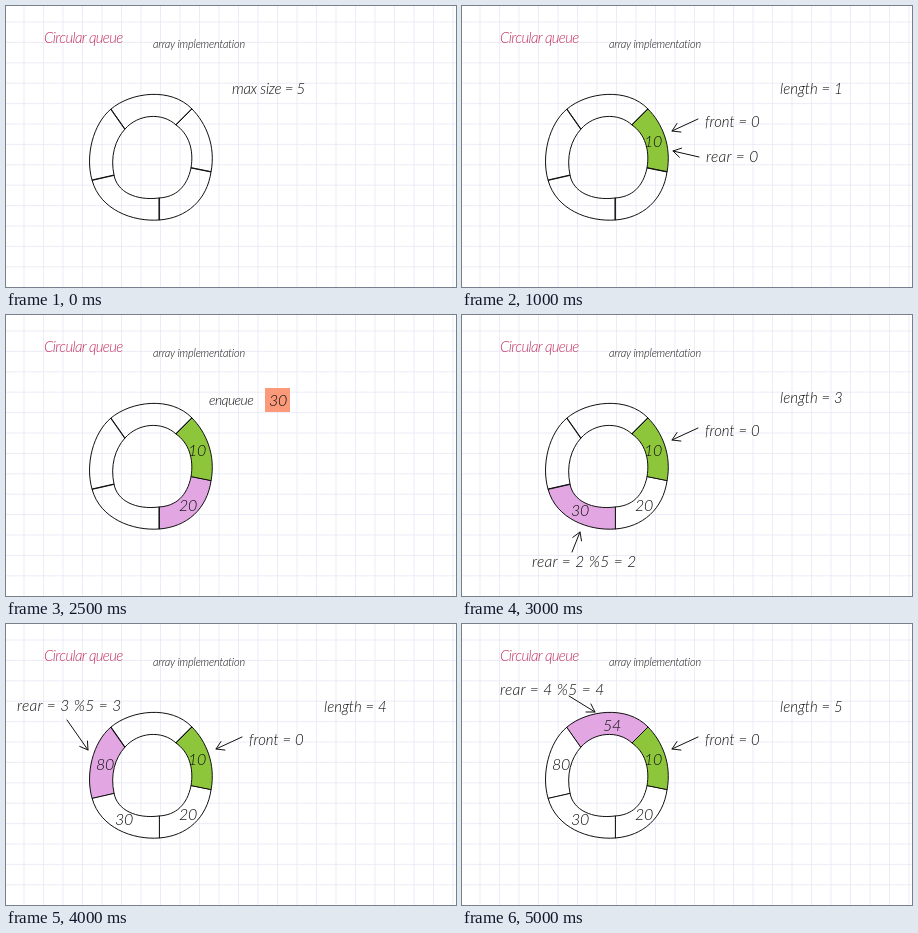
An HTML page that plays this animation: 450 px wide and 281 px high, repeating every 6000 ms.

```html
<!DOCTYPE html>
<html lang="en">
<head>
<meta charset="utf-8">
<title>Circular queue</title>
<style>
html, body { margin: 0; width: 100%; height: 100%; overflow: hidden; background: #fff; }
svg { display: block; width: 100vw; height: 100vh; }
text { font: italic 300 15px Lato, "Open Sans", sans-serif; fill: #111; }
.num { font-size: 16px; letter-spacing: -.4px; text-anchor: middle; }
.line { fill: none; stroke: #111; stroke-width: 1; stroke-linecap: round; stroke-linejoin: round; }
</style>
</head>
<body>
<svg id="stage" viewBox="0 0 450 281"></svg>
<script>
const NS = "http://www.w3.org/2000/svg";
const stage = document.getElementById("stage");
const STEP = 500, LOOP = 6000;
const GREEN = "#8dc63b", VIOLET = "#e2a6e3", ORANGE = "#fa9a7b";

function add(parent, tag, attrs, content) {
  const el = document.createElementNS(NS, tag);
  for (const key in attrs) el.setAttribute(key, attrs[key]);
  if (content !== undefined) el.textContent = content;
  parent.appendChild(el);
  return el;
}

function label(parent, x, y, content, size = 15, spacing = 0, fill = "#111") {
  const style = `font-size:${size}px;letter-spacing:${spacing}px;fill:${fill}`;
  return add(parent, "text", { x, y, style }, content);
}

function arrow(parent) {
  return add(parent, "path", { class: "line" });
}

function arrowPath(x1, y1, x2, y2) {
  const a = Math.atan2(y2 - y1, x2 - x1);
  const barb = turn => `${x2 - 9 * Math.cos(a + turn)} ${y2 - 9 * Math.sin(a + turn)}`;
  return `M${x1} ${y1}L${x2} ${y2}M${barb(.55)}L${x2} ${y2}L${barb(-.55)}`;
}

// Ruled paper
let grid = "";
for (let x = 18; x < 450; x += 19.5) grid += `M${x} 0V281`;
for (let y = 16; y < 281; y += 20.4) grid += `M0 ${y}H450`;
add(stage, "path", { d: grid, fill: "none", stroke: "#e6e8f6", "stroke-width": .8 });

label(stage, 38, 37, "Circular queue", 15, -.65, "#c2315f");
label(stage, 147, 42, "array implementation", 11, -.17);

// Clockwise ring slots: two control points and an end point per curve
const outer = [
  [200, 117, 210, 140, 205, 166],
  [201, 194, 181, 212, 153, 214],
  [127, 216, 94, 204, 86, 174],
  [79, 150, 87, 118, 105, 103],
  [125, 86, 165, 81, 186, 103]
];
const inner = [
  [183, 128, 188, 144, 185, 162],
  [181, 181, 170, 191, 153, 192],
  [130, 195, 111, 186, 108, 169],
  [104, 151, 109, 134, 119, 123],
  [132, 108, 156, 106, 170, 119]
];
const values = [10, 20, 30, 80, 54];
const spots = [[191, 141], [182, 196], [118, 201], [99, 146], [150, 107]];

const ring = add(stage, "g", {});
const slots = values.map((value, i) => {
  const prev = (i + 4) % 5;
  const from = outer[prev].slice(4), back = inner[prev].slice(4);
  const [ax, ay, bx, by, ex, ey] = inner[i];
  const d = `M${from}C${outer[i]}L${ex} ${ey}C${bx} ${by} ${ax} ${ay} ${back}Z`;
  return add(ring, "path", { d, class: "line" });
});
const numbers = values.map((value, i) =>
  add(stage, "text", { x: spots[i][0], y: spots[i][1], class: "num" }, value));

const intro = add(stage, "g", {});
label(intro, 226, 88, "max size = 5", 15, -.3);

const enqueue = add(stage, "g", {});
label(enqueue, 203, 90, "enqueue", 14, -.6);
add(enqueue, "rect", { x: 259, y: 73, width: 25, height: 24, fill: ORANGE });
const incoming = add(enqueue, "text", { x: 272, y: 91, class: "num" });

const info = add(stage, "g", {});
const length = label(info, 318, 88, "");
label(info, 243, 121, "front = 0");
arrow(info).setAttribute("d", arrowPath(236, 113, 210, 125));
const rear = label(info, 0, 0, "", 15.5, .3);
const rearArrow = arrow(info);

// Rear label position, then its arrow
const rears = [
  [244, 156, 237, 151, 211, 145],
  [237, 208, 231, 203, 203, 195],
  [70, 252, 110, 237, 118, 217],
  [11, 87, 61, 96, 82, 126],
  [38, 71, 107, 72, 133, 88]
];

function show(el, on) {
  el.setAttribute("visibility", on ? "visible" : "hidden");
}

function draw(time) {
  const step = Math.min(10, Math.floor(time % LOOP / STEP));
  const count = Math.floor(step / 2);
  const adding = step % 2 === 1;
  const placed = !adding && step > 0;
  const last = count - 1;

  slots.forEach((slot, i) => {
    const fill = i >= count ? "none" : i === 0 ? GREEN : i === last ? VIOLET : "#fff";
    slot.style.fill = fill;
    slot.style.stroke = step === 1 ? "#444" : "#111";
    show(numbers[i], i < count);
  });

  show(intro, step === 0);
  show(enqueue, adding);
  show(info, placed);
  if (adding) incoming.textContent = values[count];
  if (placed) {
    const [x, y, ...line] = rears[last];
    length.textContent = `length = ${count}`;
    rear.textContent = last ? `rear = ${last} %5 = ${last}` : "rear = 0";
    rear.setAttribute("x", x);
    rear.setAttribute("y", y);
    rearArrow.setAttribute("d", arrowPath(...line));
  }
}

const start = performance.now();
function tick() {
  draw(performance.now() - start);
  requestAnimationFrame(tick);
}
tick();
</script>
</body>
</html>
```
